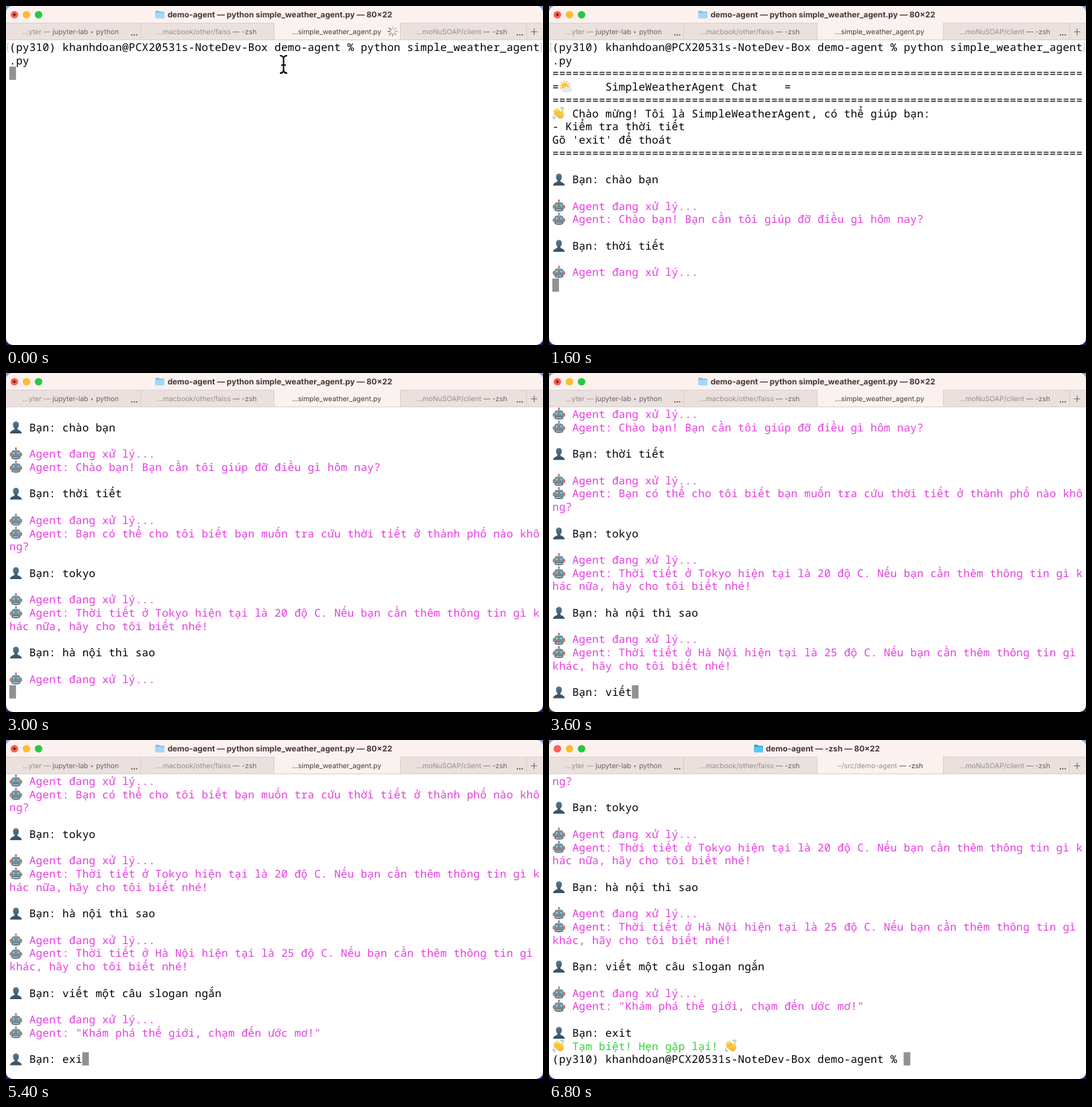
Write an HTML page that moves like this. It is 800 px wide and 505 px high and loops after 7 s.

```html
<!DOCTYPE html>
<html lang="vi">
<head>
<meta charset="utf-8">
<title>Weather agent terminal</title>
<style>
  html, body { margin: 0; width: 100%; height: 100%; overflow: hidden;
    background: linear-gradient(#8d9fd8, #1d2560 60%); }
  svg { display: block; }
  #rows text { font: 16px "Noto Sans Mono", "DejaVu Sans Mono", monospace; letter-spacing: .275px;
    white-space: pre; text-rendering: geometricPrecision; }
  #chrome text { font: 10.4px Inter, "Open Sans", sans-serif; text-anchor: middle; fill: #978e8d;
    text-rendering: geometricPrecision; }
  #chrome .title { font-size: 11.75px; font-weight: 700; fill: #403938; }
  #chrome .proc { fill: #6c6362; }
  #chrome .on { fill: #453e3d; }
</style>
</head>
<body>
<svg width="800" height="505" viewBox="0 0 800 505">
  <defs>
    <clipPath id="window"><rect width="800" height="505" rx="10"/></clipPath>
    <linearGradient id="slate" x2="0" y2="1">
      <stop stop-color="#577990"/><stop offset="1" stop-color="#344e63"/>
    </linearGradient>
    <linearGradient id="skin" x2="0" y2="1">
      <stop stop-color="#ffdc55"/><stop offset="1" stop-color="#f5ae32"/>
    </linearGradient>
    <symbol id="person" viewBox="0 0 20 20">
      <path fill="url(#slate)" d="M10 1.5c3 0 4.6 2.2 4.4 5.2-.1 2.3-1 4.1-2.2 5.1v1.3c.3 1 6.3 1.5 6.8 6.4H1c.5-4.9 6.500-5.400 6.800-6.400v-1.300C6.600 10.800 5.700 9 5.600 6.700 5.400 3.700 7 1.500 10 1.500z"/>
    </symbol>
    <symbol id="robot" viewBox="0 0 20 20">
      <path stroke="#70868f" stroke-width="1.300" d="M10 2v4"/>
      <circle cx="10" cy="2" r="1.500" fill="#e45b4e"/>
      <rect x=".6" y="8.500" width="18.800" height="6" rx="2" fill="#d9694f"/>
      <path fill="#7899a5" d="M4 5.500Q10 3 16 5.500l1.500 5-.8 7Q10 20.500 3.300 17.500l-.8-7z"/>
      <path fill="#4f6b77" d="M4.200 14h11.600l-.6 3.500Q10 19 4.800 17.500z"/>
      <g fill="#e8fbff" stroke="#35515f" stroke-width=".8">
        <circle cx="6.600" cy="9.300" r="2.200"/><circle cx="13.400" cy="9.300" r="2.200"/>
      </g>
      <g fill="#23a8ba"><circle cx="6.600" cy="9.300" r="1"/><circle cx="13.400" cy="9.300" r="1"/></g>
      <path fill="#df5143" d="M10 10.800l1.200 2.200H8.800z"/>
      <path stroke="#e9eff0" stroke-width="1.600" stroke-dasharray="1.500 .6" d="M5.700 16h8.800"/>
    </symbol>
    <symbol id="wave" viewBox="0 0 20 20">
      <g fill="none" stroke="url(#skin)" stroke-linecap="round" stroke-width="2.700">
        <path d="M10.500 11L4.200 4.800M8.500 12.500L2.700 7.500M12.500 10L7.500 3.300M8.500 15L3.500 11M15 11.500Q14 8 15.300 5.800"/>
      </g>
      <path fill="url(#skin)" d="M6 10l6-3.500 3 3.500 1.700-2q1.800 5.500-.5 8.500-3 3.500-7 .8L5 13z"/>
      <path fill="none" stroke="#d58a27" stroke-width=".6" d="M5 8.300l4 3.600M6.500 6.500l4.200 4M10 6.500l2.600 3"/>
      <path fill="none" stroke="#5e9dbd" stroke-linecap="round" d="M12 1.500q3 .6 4 3M14.500 1q2.500.7 3.300 2.500M1.500 14q.6 3 3.300 4M.9 16.500q.8 1.900 2.300 2.700"/>
    </symbol>
    <symbol id="sun" viewBox="0 0 20 20">
      <circle cx="9" cy="9" r="7" fill="none" stroke="#f5ad36" stroke-width="2.200" stroke-dasharray="1.800 2.600"/>
      <circle cx="9" cy="9" r="5.300" fill="#fcc43c"/>
      <path fill="#e3eaf0" stroke="#c5d0d9" stroke-width=".5" d="M8 18a3 3 0 0 1 0-6 4 4 0 0 1 7-.5 3.300 3.300 0 0 1 1.500 6.500z"/>
    </symbol>
  </defs>
  <g clip-path="url(#window)">
    <rect width="800" height="505" fill="#fff"/>
    <g id="chrome"></g>
    <g id="rows"></g>
  </g>
</svg>
<script>
const LOOP = 7000, COLS = 80, ROWS = 22, CELL = 9.875, PITCH = 19.73, LEFT = 5, TOP = 50.8;
const ICONS = { '👤': 'person', '🤖': 'robot', '👋': 'wave', '🌤': 'sun' };
const SHELL = '(py310) khanhdoan@PCX20531s-NoteDev-Box demo-agent % ';
const RULE = '='.repeat(COLS) + '\n';
const ASK = '\n👤 Bạn: ';
const BUSY = '\n\n🤖 Agent đang xử lý...\n';
const reply = text => `🤖 Agent: ${text}\n${ASK}`;

// Each step adds its text to the terminal at the given time.
const STEPS = [
  [0, SHELL + 'python simple_weather_agent.py\n'],
  [200, RULE + '=🌤     SimpleWeatherAgent Chat    =\n' + RULE +
    '👋 Chào mừng! Tôi là SimpleWeatherAgent, có thể giúp bạn:\n' +
    "- Kiểm tra thời tiết\nGõ 'exit' để thoát\n" + RULE + ASK],
  [400, 'chào b'],
  [600, 'ạn' + BUSY],
  [800, reply('Chào bạn! Bạn cần tôi giúp đỡ điều gì hôm nay?')],
  [1000, 't'],
  [1200, 'hời t'],
  [1400, 'iết'],
  [1600, BUSY],
  [1800, reply('Bạn có thể cho tôi biết bạn muốn tra cứu thời tiết ở thành phố nào không?')],
  [2400, 'tokyo' + BUSY],
  [2600, reply('Thời tiết ở Tokyo hiện tại là 20 độ C. Nếu bạn cần thêm thông tin gì khác nữa, hãy cho tôi biết nhé!')],
  [2800, 'hà nội t'],
  [3000, 'hì sao' + BUSY],
  [3400, reply('Thời tiết ở Hà Nội hiện tại là 25 độ C. Nếu bạn cần thêm thông tin gì khác, hãy cho tôi biết nhé!')],
  [3600, 'viết'],
  [3800, ' một câu'],
  [4000, ' slogan'],
  [4200, ' ngắn' + BUSY],
  [4600, reply('"Khám phá thế giới, chạm đến ước mơ!"')],
  [5400, 'exi'],
  [5600, 't'],
  [5800, '\n👋 Tạm biệt! Hẹn gặp lại! 👋\n' + SHELL],
];
const EXIT = 5800;

const lineColor = line => line.startsWith('🤖') ? '#e63ce2'
  : line.startsWith('👋 Tạm') ? '#32d23a' : '#000';

// Breaks text into terminal rows; an icon takes two cells.
function layout(text) {
  const rows = [];
  for (const line of text.split('\n')) {
    const newRow = () => ({ text: '', icons: [], color: lineColor(line) });
    let row = newRow();
    for (const ch of line) {
      if (row.text.length >= COLS) { rows.push(row); row = newRow(); }
      if (ICONS[ch]) row.icons.push([ICONS[ch], row.text.length]);
      row.text += ICONS[ch] ? '  ' : ch;
    }
    rows.push(row);
  }
  return rows;
}

function drawTerminal(text) {
  const all = layout(text), first = Math.max(0, all.length - ROWS);
  let svg = '';
  all.slice(first).forEach((row, i) => {
    const y = TOP + i * PITCH;
    svg += `<text x="${LEFT}" y="${y + 16.2}" fill="${row.color}">${row.text}</text>`;
    for (const [name, col] of row.icons)
      svg += `<use href="#${name}" x="${LEFT + col * CELL}" y="${y + .3}" width="19.6" height="19.6"/>`;
  });
  const x = LEFT + all.at(-1).text.length * CELL, y = TOP + (all.length - 1 - first) * PITCH;
  svg += `<rect x="${x}" y="${y}" width="${CELL}" height="${PITCH}" fill="#919191"/>`;
  if (!first) svg += '<path d="M4.500 55.500h-2v12h2M795.500 55.500h2v12h-2" fill="none" stroke="#bdbdbd"/>';
  return svg;
}

function spinner() {
  let svg = '';
  for (let i = 0; i < 8; i++)
    svg += `<path d="M576 34.500v-3.500" transform="rotate(${i * 45} 576 38)" stroke="#635b5a"
      stroke-width="1.500" stroke-linecap="round" opacity="${.3 + i * .09}"/>`;
  return svg;
}

const IBEAM = 'M408 74q5 0 5.500 4v18q-.5 4-5.500 4M419 74q-5 0-5.500 4v18q.5 4 5.500 4M410 88h7';
const pointer = `<g fill="none"><path d="${IBEAM}" stroke="#fff" stroke-width="4"/>
  <path d="${IBEAM}" stroke="#111" stroke-width="2.200"/></g>`;

function drawChrome(time) {
  const done = time >= EXIT, starting = time === 0;
  const label = (x, path, proc = '', cls = '') =>
    `<text x="${x}" y="42" class="${cls}">${path}<tspan class="${done && x === 493 ? 'on' : 'proc'}">${proc}</tspan></text>`;
  const light = (x, color) => `<circle cx="${x}" cy="13" r="5.600" fill="${color}"/>`;
  const folderX = done ? 305.5 : 222.5;
  return `
    <rect width="800" height="51" fill="#fbf1ef"/>
    <path d="M0 25.500h400V51H0zM587 25.500h213V51H587z" fill="#eae0de"/>
    <path d="M0 25.500h400M587 25.500h213M200.500 26v25M399.500 26v25M587.500 26v25M775.500 26v25M0 50.500h800"
      stroke="#d9cecc" fill="none"/>
    ${light(12.5, '#fe5f57')}${light(30.5, '#febc2e')}${light(48.5, '#28c840')}
    ${done ? '' : '<circle cx="12.500" cy="13" r="2" fill="#7d1712"/>'}
    <g transform="translate(${folderX} 7)">
      <path d="M0 1.500q0-1.500 1.500-1.500h3.500l1.500 1.500h5.500q1.500 0 1.500 1.500v7H0z" fill="${done ? '#2f9fd5' : '#82bce2'}"/>
      <rect y="3" width="13.500" height="8.500" rx="1.200" fill="${done ? '#59c5f2' : '#a5d7f3'}"/>
    </g>
    <text class="title" x="408" y="17">demo-agent — ${done ? '-zsh' : 'python simple_weather_agent.py'} — 80×22</text>
    ${label(96.5, '…yter — ', 'jupyter-lab ‣ python')}
    ${label(299, '…macbook/other/faiss ', '— -zsh')}
    ${done ? label(493, '~/src/demo-agent ', '— -zsh') : label(492.5, '…simple_weather_agent.py', '', 'on')}
    ${label(679, '…moNuSOAP/client ', '— -zsh')}
    <path d="M186.500 43h9M761 43h9" stroke="#655d5c" stroke-width="1.800" stroke-dasharray="1.800 1.800"/>
    <path d="M782 38.500h9.500M786.800 33.700v9.500" stroke="#766d6c" stroke-width="1.200"/>
    ${starting ? spinner() + pointer : ''}`;
}

const chrome = document.getElementById('chrome'), rows = document.getElementById('rows');
const start = performance.now();
let shown = -1;

function tick() {
  const time = (performance.now() - start) % LOOP;
  const step = STEPS.findLastIndex(([at]) => at <= time);
  if (step !== shown) {
    shown = step;
    rows.innerHTML = drawTerminal(STEPS.slice(0, step + 1).map(([, text]) => text).join(''));
    chrome.innerHTML = drawChrome(STEPS[step][0]);
  }
  requestAnimationFrame(tick);
}
tick();
</script>
</body>
</html>
```
